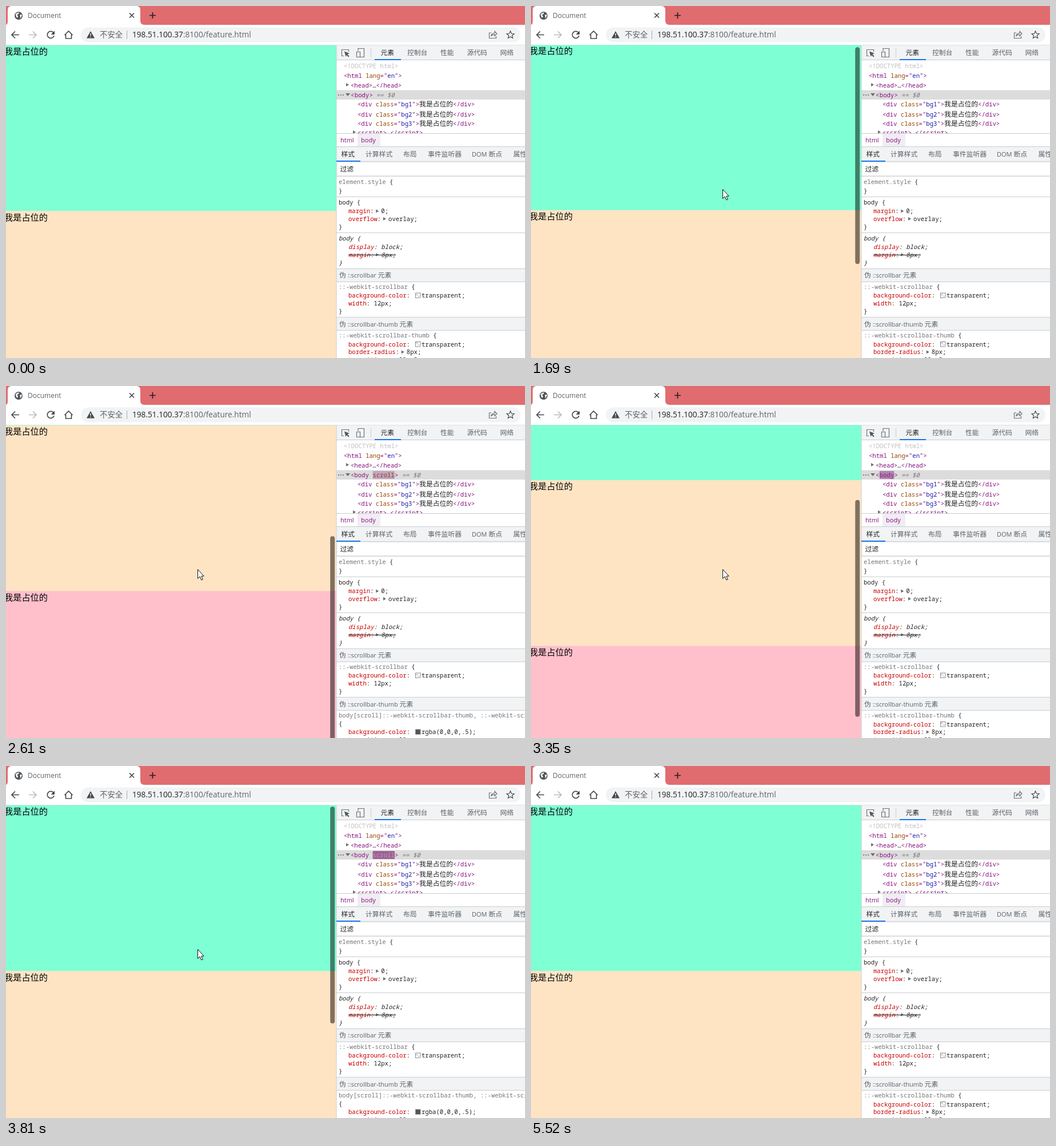
These frames come from a looping animation (908 px wide and 617 px high, 5850 ms). An HTML page:

```html
<!DOCTYPE html>
<html lang="zh-CN">
<head>
<meta charset="utf-8">
<title>Overlay scrollbar</title>
<style>
html, body { margin: 0; width: 100%; height: 100%; overflow: hidden; background: #fff; }
svg { display: block; }
text { white-space: pre; font: 11px "Open Sans", sans-serif; fill: #5f6368; }
.mono { font: 10.6px "Noto Sans Mono", monospace; fill: #222; }
.cjk { font-family: "Noto Sans CJK SC", "Noto Sans CJK", sans-serif; font-size: 11.8px; }
.page .cjk { font-size: 15.2px; fill: #000; }
.site .cjk { font-size: 13.4px; }
.t { fill: #881280; } .a { fill: #994500; } .v { fill: #1a1aa6; }
.g { fill: #777; } .c { fill: #c0c0c0; } .r { fill: #c80000; } .d { fill: #222; }
.i { font-style: italic; }
.icon { fill: none; stroke: #45494d; stroke-width: 1.7; }
.thin { stroke-width: 1.2; stroke: #6e7276; }
</style>
</head>
<body>
<svg id="stage" width="908" height="617" viewBox="0 0 908 617">
  <defs><clipPath id="view"><path d="M0 68.500H578V617H0Z"/></clipPath></defs>
  <path fill="#e06c70" d="M0 0H908V33H0Z"/>
  <path fill="#fff" d="M0 33Q3 32 3 27V7Q3 0 10 0H228Q235 0 235 7V26Q235 33 242 33H908V68H0Z"/>
  <path fill="#dfe1e4" d="M0 68H908V69H0Z"/>
  <g clip-path="url(#view)">
    <g id="page" class="page"></g>
    <rect id="thumb" x="567.200" width="8" height="380" rx="4" fill-opacity=".5"/>
  </g>

  <rect x="131" y="37.500" width="769" height="26" rx="13" fill="#f1f3f4"/>
  <circle cx="22" cy="17" r="7" fill="#50555a"/>
  <path fill="#fff" d="M17 14Q19 11 23 11.500L22 14L19 15.500L21 17.500L20 21Q17 19 17 14M24 16L27.500 14.500Q28 19 24.500 21.500L25 18.500Z"/>
  <path class="icon" stroke-width="1.5" d="M216 12.500L224 20.500M224 12.500L216 20.500"/>
  <path class="icon" style="stroke:#222" d="M251 16.500H262M256.500 11V22"/>
  <path class="icon" d="M23 50.500H10.500M16 44.500L10 50.500L16 56.500"/>
  <path class="icon" style="stroke:#babcbe" d="M40 50.500H52.500M47 44.500L53 50.500L47 56.500"/>
  <path class="icon" d="M83.500 47.500A6 6 0 1 0 84 52"/>
  <path fill="#45494d" d="M85 43.500V50H78.500Z"/>
  <path class="icon" d="M102.500 51L109.500 44L116.500 51M104.500 50V57H114.500V50"/>
  <path fill="#45494d" d="M148 44L155 56.500H141Z"/>
  <path stroke="#f1f3f4" stroke-width="1.5" d="M148 48V52M148 53.200V54.800"/>
  <path fill="#a9acb0" d="M211 43H212V58H211Z"/>
  <path class="icon thin" d="M849 47H845.500V56.500H857.500V53M848.500 53Q849.500 47.500 855 47.500V44.500L859 48.500L855 52.500V49.800Q851 49.500 848.500 53"/>
  <path class="icon thin" style="stroke:#45494d" d="M882.500 44L884.400 48.300L889 48.700L885.500 51.800L886.600 56.300L882.500 54L878.400 56.300L879.500 51.800L876 48.700L880.600 48.300Z"/>

  <path fill="#fff" d="M578 69H908V617H578Z"/>
  <path fill="#dcdcdc" d="M578 147.500H908V164H578Z"/>
  <g id="tree"></g>
  <path fill="#fff" d="M578 223H908V247H578Z"/>
  <path fill="#f0edf3" d="M615 224H655V246H615Z"/>
  <path fill="#f1f3f4" d="M578 69H908V94H578ZM578 247H908V298H578ZM578 461H908V483H578ZM578 546H908V568H578Z"/>
  <path fill="#fff" d="M580 275H908V296H580Z"/>
  <path id="lines" stroke="#cacdd1"/>
  <path fill="#cacdd1" d="M577.500 69H578.500V617H577.500ZM638 74H639V90H638Z"/>
  <path fill="#1a73e8" d="M645 93H691V95H645ZM578 271H620V273H578Z"/>
  <path class="icon thin" d="M599.500 80V76.500H587.500V87.500H591"/>
  <path fill="#50555a" d="M592 79.500L601 83L597.500 84.500L600.500 88L599 89.500L596 86L594.500 89Z"/>
  <path class="icon thin" d="M616 79V74.500H626.500V89.500H620M613.500 80.500H619.500V89.500H613.500Z"/>
  <g id="panel"></g>
  <path id="cursor" fill="#fff" stroke="#111" d="M.5 .5V16.500L4.200 13L6.800 19L9.300 18L6.800 12.200H11.200Z"/>
</svg>
<script>
const LOOP = 5850, NS = 'http://www.w3.org/2000/svg';
const $ = id => document.getElementById(id);

function add(parent, tag, attrs) {
  const el = document.createElementNS(NS, tag);
  for (const k in attrs) el.setAttribute(k, attrs[k]);
  return parent.appendChild(el);
}

// Text made of class/string pairs; Chinese runs get their own font.
function text(parent, x, y, cls, ...runs) {
  const el = add(parent, 'text', { x, y, class: cls });
  for (let i = 0; i < runs.length; i += 2)
    for (const part of runs[i + 1].split(/([\u4e00-\u9fff]+)/))
      if (part) add(el, 'tspan', { class: runs[i] + (part > '\u4e00' ? ' cjk' : '') }).textContent = part;
  return el;
}
const code = (parent, x, mid, ...runs) => text(parent, x, mid + 3.7, 'mono', ...runs);
const label = (x, mid, str, cls = '') => text($('panel'), x, mid + 4.4, '', cls, str);
const arrow = (parent, x, y, down) => add(parent, 'path', {
  d: down ? `M${x} ${y}h8l-4 5z` : `M${x} ${y - 3}v6l5 -3z`, fill: '#6e6e6e' });

// Page sections
const FILLS = ['#7fffd4', '#ffe4c4', '#ffc0cb'], PART = 290.5;
FILLS.forEach((fill, i) => {
  const y = 68.8 + i * PART;
  add($('page'), 'rect', { y, width: 578, height: PART + 1, fill });
  text($('page'), -3, y + 16.2, '', '', '我是占位的');
});

// Toolbar
const stage = $('stage');
const bar = stage.insertBefore(document.createElementNS(NS, 'g'), $('tree'));
text(bar, 38, 21, '', '', 'Document').style.fontSize = '12px';
text(bar, 164, 55.2, 'site', '', '不安全');
text(bar, 221, 55, '', 'd', '198.51.100.37', '', ':8100/feature.html').style.fontSize = '13.65px';

// Element tree
const tree = $('tree');
code(tree, 591, 105.5, 'c', '<!DOCTYPE html>');
code(tree, 591, 122, 't', '<html ', 'a', 'lang', 't', '="', 'v', 'en', 't', '">');
arrow(tree, 595, 138);
code(tree, 603, 139.5, 't', '<head>', 'd', '…', 't', '</head>');
for (const x of [582, 586, 590]) add(tree, 'circle', { cx: x, cy: 156, r: 1.1, fill: '#6e6e6e' });
arrow(tree, 594, 153, true);
[172.5, 190, 206.5].forEach((y, i) => code(tree, 615, y,
  't', '<div ', 'a', 'class', 't', '="', 'v', 'bg' + (i + 1), 't', '">', 'd', '我是占位的', 't', '</div>'));
arrow(tree, 607, 221);
code(tree, 615, 222, 't', '<script>', 'd', '…', 't', '<' + '/script>');

// The body row and the thumb rule exist twice: idle and scrolling
function bodyRow(x, width, word, cls, before, after, tail) {
  const row = add(tree, 'g', {});
  const mark = add(row, 'rect', { x, y: 149, width, height: 14, rx: 1, fill: '#863488' });
  code(row, 603, 156, 't', before);
  const name = code(row, x, 156, cls, word).firstChild;
  code(row, x + width, 156, 't', after);
  code(row, tail, 156, 'g i', '== $0');
  return { row, mark, name };
}
const idle = bodyRow(609.8, 25.6, 'body', 't', '<', '>', 648);
const busy = bodyRow(641.6, 38.4, 'scroll', 'a', '<body ', '>', 693);
idle.rgb = [136, 18, 128];
busy.rgb = [153, 69, 0];

// Style panel
const panel = $('panel');
$('lines').setAttribute('d', [94, 223, 246, 272, 298, 334, 397, 460, 483, 545, 568]
  .map(y => `M578 ${y + .5}H908`).join(''));
label(655.5, 82, '元素', 'd');
label(702, 82, '控制台');
label(760, 82, '性能');
label(806.5, 82, '源代码');
label(864.5, 82, '网络');
label(585, 235, 'html', 't');
label(621, 235, 'body', 't');
label(586.5, 260, '样式', 'd');
label(629, 260, '计算样式');
label(695, 260, '布局');
label(738, 260, '事件监听器');
label(815, 260, 'DOM 断点');
label(887.5, 260, '属性');
label(584.5, 286, '过滤', 'd');
label(583, 472, '伪 ::scrollbar 元素');
label(583, 557.5, '伪 ::scrollbar-thumb 元素');

// A declaration; kind is 'arrow' or a swatch colour
function rule(parent, y, name, value, kind, slant = '') {
  const end = 599 + 6.36 * (name.length + 1);
  code(parent, 599, y, 'r' + slant, name, 'd' + slant, ':');
  let x = end + 6.4;
  if (kind === 'arrow') {
    arrow(parent, end + 3.7, y);
    x = end + 12.8;
  } else if (kind) {
    add(parent, 'rect', { x: 716.5, y: y - 4.5, width: 8.5, height: 8.5, fill: kind, stroke: '#8b8b8b' });
    if (kind === '#fff') add(parent, 'path', { d: `M717 ${y - 4}h4v4h4v4h-4v-4h-4z`, fill: '#ddd' });
    x = 727;
  }
  code(parent, x, y, 'd' + slant, value + ';');
}
const close = y => code(panel, 582, y, 'd', '}');
code(panel, 582, 308, 'g', 'element.style', 'd', ' {');
close(324);
code(panel, 582, 344, 'd', 'body {');
rule(panel, 359.5, 'margin', '0', 'arrow');
rule(panel, 373, 'overflow', 'overlay', 'arrow');
close(387);
code(panel, 582, 407, 'd i', 'body {');
rule(panel, 422.5, 'display', 'block', '', ' i');
rule(panel, 436, 'margin', '8px', 'arrow', ' i');
add(panel, 'path', { d: 'M599 436.500H682', stroke: '#222' });
code(panel, 582, 450, 'd i', '}');
code(panel, 582, 492, 'g', '::-webkit-scrollbar', 'd', ' {');
rule(panel, 507.5, 'background-color', 'transparent', '#fff');
rule(panel, 521, 'width', '12px');
close(535);

idle.css = add(panel, 'g', {});
code(idle.css, 582, 577.5, 'g', '::-webkit-scrollbar-thumb', 'd', ' {');
rule(idle.css, 593, 'background-color', 'transparent', '#fff');
rule(idle.css, 606.5, 'border-radius', '8px', 'arrow');
rule(idle.css, 620, 'transition', 'all .3s ease', 'arrow');
busy.css = add(panel, 'g', {});
code(busy.css, 582, 577.5, 'g', 'body[scroll]::-webkit-scrollbar-thumb, ::-webkit-scrollbar-thumb:hover');
code(busy.css, 582, 592, 'd', '{');
rule(busy.css, 606.5, 'background-color', 'rgba(0,0,0,.5)', '#555');
rule(busy.css, 620, 'transition', 'all', 'arrow');

// Keys are [time, value, ...]; linear between, held outside
function track(keys, t, n = 1) {
  if (t <= keys[0][0]) return keys[0][n];
  for (let i = 1; i < keys.length; i++) {
    const a = keys[i - 1], b = keys[i];
    if (t < b[0]) return a[n] + (b[n] - a[n]) * (t - a[0]) / (b[0] - a[0]);
  }
  return keys[keys.length - 1][n];
}
const SCROLL = [[1689, 0], [1690, 1], [1770, 38], [2050, 186], [2230, PART],
  [3110, PART], [3200, 264], [3530, 111.5], [3700, 18], [3770, 0]];
const POINTER = [[670, 645, 478], [720, 480, 372], [770, 345, 285], [820, 296, 260],
  [960, 296, 260], [1130, 335, 321], [4900, 335, 321], [5180, 570, 430], [5440, 698, 617]];
const SWITCHES = [[1740, busy], [2740, idle], [3470, busy], [4220, idle]];

const show = (el, on) => el.setAttribute('visibility', on ? 'visible' : 'hidden');

function draw(t) {
  const s = track(SCROLL, t), x = track(POINTER, t), y = track(POINTER, t, 2);
  $('page').setAttribute('transform', `translate(0 ${-s})`);
  $('thumb').setAttribute('y', 71.3 + .661 * s);
  const hover = t > 4900 && x > 565 && x < 578;
  show($('thumb'), t >= 1690 && t < 2740 || t >= 3120 && t < 4220 || hover);
  $('cursor').setAttribute('transform', `translate(${Math.round(x)} ${Math.round(y)})`);
  show($('cursor'), t >= 670 && t < 5440);

  const [since, now] = SWITCHES.filter(k => k[0] <= t).pop() || [-LOOP, idle];
  for (const state of [idle, busy]) {
    show(state.row, state === now);
    show(state.css, state === now);
  }
  const age = Math.min(1, (t - since) / 1300), tint = Math.min(1, age * 2);
  now.mark.setAttribute('opacity', 1 - age);
  now.name.style.fill = `rgb(${now.rgb.map(c => Math.round(255 + (c - 255) * tint))})`;
}

function tick() {
  draw(performance.now() % LOOP);
  requestAnimationFrame(tick);
}
tick();
</script>
</body>
</html>
```
